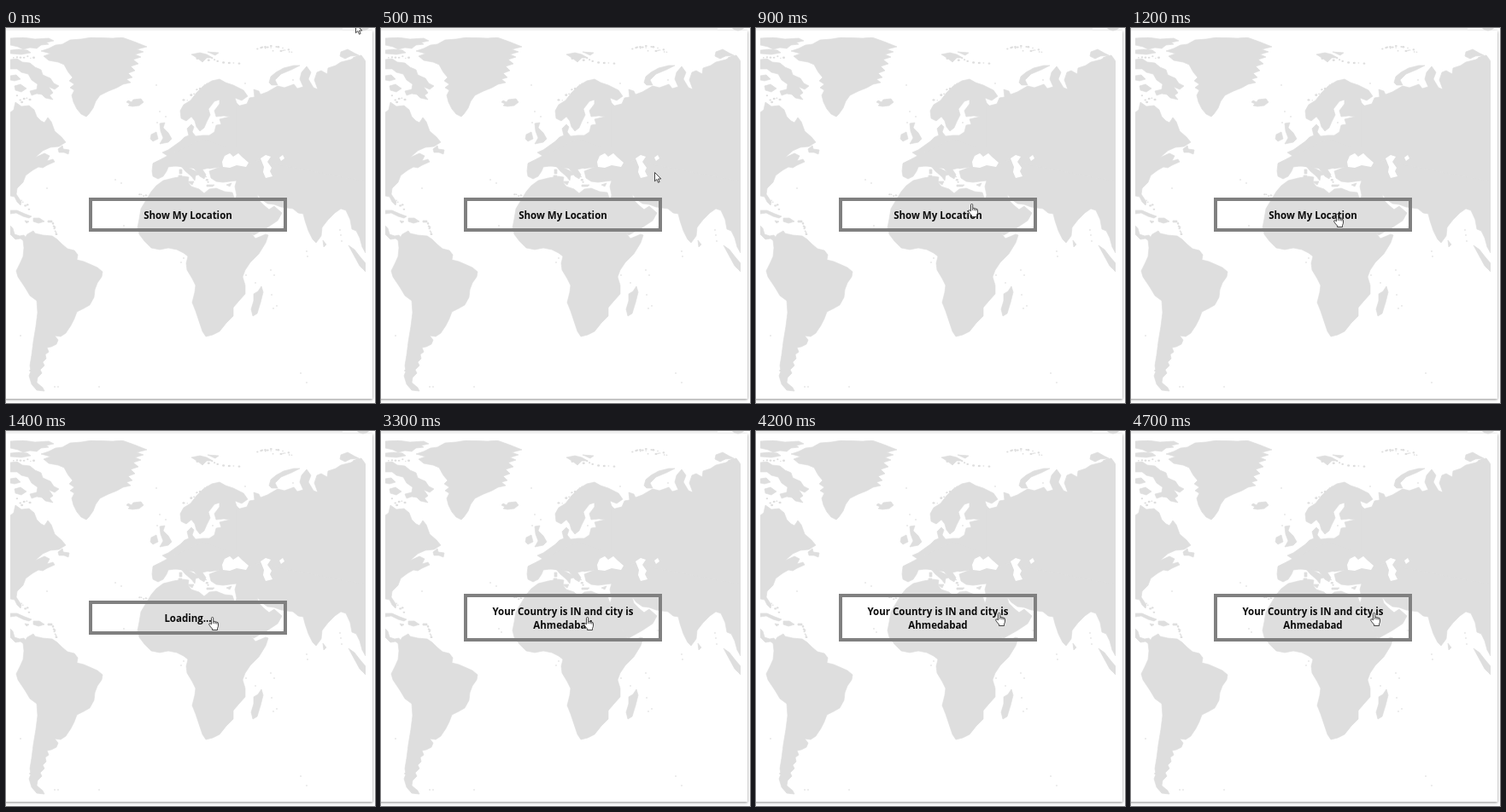
Animation, 432 px wide and 440 px high, one loop 4.8 s. Source, as an HTML page:

```html
<!DOCTYPE html>
<html lang="en">
<head>
<meta charset="utf-8">
<title>Show My Location</title>
<style>
html, body { margin: 0; width: 100%; height: 100%; overflow: hidden; background: #fff; }
svg { position: absolute; left: 0; top: 0; width: 432px; height: 440px; }
.card { position: absolute; left: -8px; top: 3px; width: 437px; height: 432px;
  background: #fff; box-shadow: 0 1px 3px rgba(0, 0, 0, .45); }
.land { fill: #dedede; stroke: #dedede; stroke-width: .7; stroke-linejoin: round; }
.sea { fill: #fff; stroke: none; }
.box { fill: none; stroke: #808080; stroke-width: 4; }
text { font: 700 11.5px "Open Sans", "Noto Sans", sans-serif; text-anchor: middle; fill: #0b0b0b; }
.pointer { fill: #fff; stroke: #333; stroke-width: .9; stroke-linejoin: round; }
</style>
</head>
<body>
<div class="card"></div>
<svg viewBox="0 0 432 440">
  <rect width="394" height="3" fill="#f0f0f0"/>
  <path d="M411 0Q413 3 418 3.4Q423 3 425 0Z" fill="#dcdcdc"/>
  <clipPath id="frame"><rect x="5" y="11" width="416" height="416"/></clipPath>
  <g class="land" clip-path="url(#frame)">
    <!-- Greenland, Iceland -->
    <path d="M41 27L50 24 58 20 66 19 75 14 88 13 100 11 125 12 136 11 150 16 165 22 153 25 161 28 151 31 158 34 149 37 155 42 146 45 151 50 143 53 148 58 141 60 146 64 137 66 130 70 120 74 110 79 105 86 102 94 97 101 94 104 88 101 83 95 79 87 77 79 80 73 75 70 80 66 74 62 78 58 73 52 68 43 61 40 50 38 44 33 52 30Z"/>
    <path d="M141 87L143 85 147 87 149 84 158 83 161 87 156 91 148 92 143 91 145 89Z"/>
    <!-- North America -->
    <path d="M5 12L20 11 34 13 50 12 56 15 47 17 50 19 41 20 36 24 28 23 20 25 14 22 5 20Z"/>
    <path d="M5 26L15 25 25 26 29 29 18 31 5 30Z"/>
    <path d="M5 37L13 36 19 40 28 41 34 46 41 49 43 55 52 59 56 65 62 68 57 72 50 69 55 76 51 79 55 84 46 82 42 78 36 77 30 79 28 74 36 72 37 66 30 61 26 54 18 52 13 48 5 48Z"/>
    <path d="M10 68L17 66 24 71 18 75 11 73Z"/>
    <path d="M5 56L12 55 17 60 10 62 5 61Z"/>
    <path d="M5 99L9 96 11 87 18 92 27 91 33 96 36 104 41 109 45 111 49 105 53 110 57 121 65 128 70 134 62 139 52 140 43 144 34 152 45 147 51 150 48 156 55 154 57 157 48 161 43 164 38 163 31 167 23 173 20 181 13 188 12 195 18 204 17 208 13 204 10 198 5 197Z"/>
    <path d="M61 142L66 138 67 142 74 143 73 148 68 146 62 146Z"/>
    <path d="M5 214L13 214 22 218 30 221 27 223 20 221 12 217 5 218ZM32 223L39 223 45 227 38 229 32 227ZM22 226L27 227 24 229ZM49 226H54V228H49Z"/>
    <path d="M5 232L8 235 10 242 16 244 21 243 24 247 21 250 17 247 11 248 5 242Z"/>
    <!-- South America -->
    <path d="M20 249L25 242 32 238 34 241 43 243 54 244 60 248 66 254 72 259 80 261 84 266 83 272 91 274 98 277 107 281 113 286 112 292 107 299 104 307 103 316 98 325 91 329 83 333 80 341 76 349 70 358 64 362 57 361 61 366 59 371 53 374 48 375 50 380 46 383 47 388 43 392 45 396 40 401 42 405 37 410 36 416 43 422 45 426 36 425 30 418 27 408 29 403 28 396 30 384 32 368 35 350 37 334 36 320 28 314 22 304 14 292 12 285 16 277 20 268 21 258Z"/>
    <!-- Europe -->
    <path d="M172 159L178 156 188 158 189 150 183 146 190 143 197 138 204 133 209 128 214 126 212 118 217 113 220 116 218 122 222 127 230 126 238 126 244 122 246 114 252 113 250 107 262 104 255 103 246 104 244 97 250 89 250 84 244 86 237 95 239 102 235 110 232 117 227 121 223 116 221 109 217 104 211 109 205 106 204 97 208 90 216 85 223 76 231 68 241 62 250 60 257 64 266 67 278 73 283 80 276 85 268 82 270 88 274 92 300 90 300 166 284 166 262 160 250 163 238 165 232 162 228 166"/>
    <path d="M172 159L189 150 230 130 260 140 258 162 238 164 230 166 234 172 232 177 227 174 222 167 216 160 209 155 207 158 214 164 222 168 226 172 222 173 221 179 217 174 210 168 204 161 198 162 190 163 188 168 184 174 178 177 172 174 171 168Z"/>
    <path d="M180 112L186 111 184 117 190 123 194 130 190 134 180 136 184 129 181 121Z"/>
    <path d="M170 125L176 122 178 130 172 133 169 130Z"/>
    <path d="M203 166H206V171H203ZM202 173H206V179H202ZM212 180L220 180 218 184ZM235 184L244 184 242 186 235 186Z"/>
    <!-- Asia -->
    <path d="M270 92L282 89 285 82 291 81 290 72 296 74 298 78 306 75 318 68 326 70 337 66 341 71 348 69 344 60 346 52 352 45 357 52 354 60 360 70 365 72 361 61 364 52 369 50 376 54 377 47 386 44 392 40 404 37 410 33 416 32 421 39 421 210 300 196 284 170 270 140Z"/>
    <path d="M238 168L248 164 260 160 290 155 421 180 421 264 417 257 414 246 410 238 405 236 403 225 398 214 392 212 385 217 377 225 370 234 369 244 363 252 359 248 354 238 350 226 348 218 342 217 336 212 322 210 314 207 306 206 299 201 294 195 296 202 302 208 308 213 314 209 323 217 318 226 306 234 290 243 286 240 280 228 274 216 268 203 270 196 268 186 270 179 262 180 254 181 246 180 240 176Z"/>
    <path d="M401 255L408 260 415 269 421 276 421 286 414 279 408 268Z"/>
    <path d="M371 249L375 254 372 257ZM258 184L264 182 262 186Z"/>
    <path d="M308 64L310 57 316 52 325 47 337 44 344 44 334 49 322 54 315 61 318 67 311 67Z"/>
    <path d="M217 31L227 29 235 31 242 35 235 35 230 40 225 36ZM236 28L249 29 245 32ZM392 28L400 25 407 29 413 32 403 33 397 36 391 33Z"/>
    <!-- Africa -->
    <path d="M184 179L196 176 208 174 214 175 213 181 217 186 226 189 232 194 238 189 246 188 256 192 265 193 268 202 274 213 279 224 283 234 288 242 292 247 304 242 307 243 304 252 296 265 286 275 280 284 277 292 280 302 280 312 272 321 266 328 266 338 258 346 250 356 242 360 234 362 230 356 226 344 222 332 218 322 221 310 222 302 218 294 212 284 211 276 213 268 208 264 200 260 190 258 180 260 170 258 162 250 156 242 154 234 156 224 158 212 164 202 170 192 176 185Z"/>
    <path d="M299 303L301 310 298 322 294 335 289 338 287 330 290 320 290 312 295 309Z"/>
    <!-- inland seas -->
    <path class="sea" d="M253 157L256 150 262 147 266 151 272 147 276 151 284 158 281 163 270 161 262 164 254 163Z"/>
    <path class="sea" d="M298 153L304 149 310 151 306 157 311 164 309 168 312 174 304 176 301 169 302 163Z"/>
    <path class="sea" d="M320 152L324 149 326 153 322 156Z"/>
    <g id="isles" stroke="none"></g>
  </g>
  <g id="short">
    <rect class="box" x="99" y="201" width="228" height="36"/>
    <text id="ask" x="213" y="224">Show My Location</text>
    <text id="wait" x="213" y="224">Loading...</text>
  </g>
  <g id="tall">
    <rect class="box" x="99" y="193" width="228" height="52"/>
    <text x="213" y="216">Your Country is IN and city is</text>
    <text x="213" y="232">Ahmedabad</text>
  </g>
  <g id="cursor" class="pointer">
    <path id="arrow" d="M.5 .5V10.8L2.9 8.6 4.5 12.3 6.1 11.6 4.6 8H7.8Z"/>
    <path id="hand" d="M3.5 8.8V1.6a1.1 1.1 0 0 1 2.2 0V5.5q2-.7 2.2.5 1.7-.5 2 .5 1.6-.3 1.6 1.2V10q0 2-1 3.3V15.5H4.5V14Q2.5 12 .8 9.3.4 7.6 1.8 7.8 2.8 8 3.5 8.8ZM5.7 5.5V8M7.9 6V8.3M9.9 6.5V8.6"/>
  </g>
</svg>
<script>
const LOOP = 4800;
const $ = id => document.getElementById(id);

// Rows of [time, value], each held until the next one.
function hold(id, prop, rows) {
  const frames = rows.map(([t, v]) => ({ offset: t / LOOP, [prop]: v, easing: 'step-end' }));
  frames.push({ offset: 1, [prop]: rows[rows.length - 1][1] });
  $(id).animate(frames, { duration: LOOP, iterations: Infinity });
}

function show(id, from, to) {
  const rows = [[0, from ? 0 : 1]];
  if (from) rows.push([from, 1]);
  if (to < LOOP) rows.push([to, 0]);
  hold(id, 'opacity', rows);
}

const moves = [
  [0, 409, -5], [200, 404, 3], [300, 390, 25], [400, 356, 92], [500, 320, 169],
  [600, 166, 207], [700, 187, 200], [800, 261, 199], [900, 248, 206],
  [1000, 243, 211], [1100, 239, 215], [1200, 237, 218],
  [3400, 226, 219], [3500, 207, 219], [3600, 186, 218], [3700, 168, 218],
  [4000, 192, 217], [4100, 240, 215], [4200, 280, 213], [4300, 254, 214],
  [4400, 216, 215], [4500, 183, 215], [4600, 232, 214], [4700, 280, 213]
];
hold('cursor', 'transform', moves.map(([t, x, y]) => [t, `translate(${x}px, ${y}px)`]));
show('arrow', 0, 600);
show('hand', 600, LOOP);
show('short', 0, 3300);
show('ask', 0, 1400);
show('wait', 1400, 3300);
show('tall', 3300, LOOP);

let seed = 7;
const rand = () => (seed = seed * 16807 % 2147483647) / 2147483647;

function isle(x, y, r) {
  const c = document.createElementNS('http://www.w3.org/2000/svg', 'ellipse');
  c.setAttribute('cx', x);
  c.setAttribute('cy', y);
  c.setAttribute('rx', r);
  c.setAttribute('ry', r * .8);
  $('isles').append(c);
}

// Islets scattered along a line: x1, y1, x2, y2, count, spread.
[
  [8, 33, 34, 35, 7, 2], [10, 82, 30, 86, 6, 4], [222, 34, 250, 39, 8, 3],
  [294, 22, 336, 26, 18, 3], [206, 88, 238, 62, 8, 2], [394, 26, 412, 38, 8, 3],
  [252, 38, 276, 42, 4, 2], [54, 228, 60, 242, 8, 1.5], [27, 212, 18, 203, 5, 2],
  [228, 166, 238, 180, 7, 2], [156, 196, 166, 198, 5, 1.5], [34, 422, 28, 400, 6, 2]
].forEach(([x1, y1, x2, y2, n, s]) => {
  for (let i = 0; i < n; i++) {
    const k = (i + .5) / n;
    isle(x1 + (x2 - x1) * k + (rand() - .5) * s, y1 + (y2 - y1) * k + (rand() - .5) * s * 2, .8 + rand() * .8);
  }
});

[
  [17, 361], [48, 188], [57, 421], [61, 421], [109, 421], [345, 405], [352, 416],
  [138, 232], [141, 236], [128, 178], [135, 182], [176, 67], [180, 98], [187, 104],
  [177, 111], [352, 262], [353, 268], [310, 284], [314, 290], [317, 326], [313, 329],
  [292, 299], [311, 313], [281, 290], [205, 275], [208, 270], [391, 237], [392, 243],
  [393, 250], [324, 234], [336, 61], [280, 65], [230, 115], [242, 111]
].forEach(([x, y]) => isle(x, y, 1));
</script>
</body>
</html>
```
